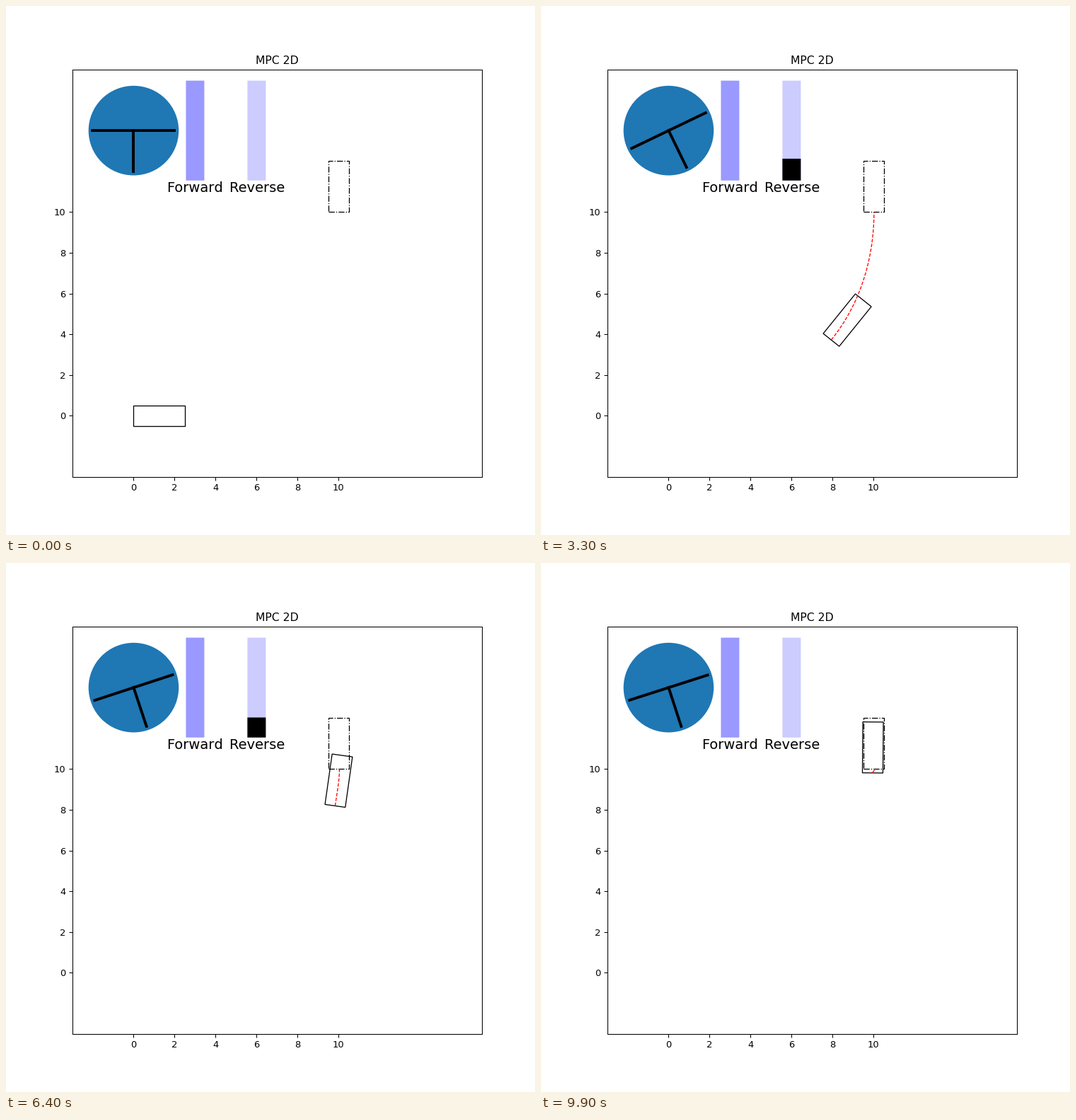
These frames come from a looping animation (748 px wide and 748 px high, 10 s). A matplotlib script:

```python
import numpy as np
import matplotlib.pyplot as plt
from matplotlib.animation import FuncAnimation
from matplotlib.patches import Circle, Rectangle

plt.rcParams["text.kerning_factor"] = 6

FRAMES = 100
LAST = FRAMES - 1
CAR_W, CAR_L = 1.0, 2.5
WHEELBASE = 1.95
DRAG = 0.04
HUB = (0, 14)
FORWARD_X, REVERSE_X, BAR_Y = 3, 6, 12

# Launch, cruise, brake, coast: (end frame, push on the car, pedal shown).
PHASES = ((10, 0.955, 1.1), (33, 0.338, 0.07),
          (37, -0.4, -0.42), (FRAMES, 0.008, -0.2))


def phase(n):
    return next((push, pedal) for end, push, pedal in PHASES if n < end)


def bump(n, centre, width):
    return np.exp(-((n - centre) / width) ** 2)


def wheel_angle(n):
    """Steady left turn, a brief correction, a tighter bend, then easing off."""
    if n == 0:
        return 0.0
    ease = 1 / (1 + np.exp((n - 54) / 4))
    angle = 17.9 + 4.7 * ease + 4.4 * bump(n, 38, 9) - 18 * bump(n, 26, 1.13)
    return np.radians(angle)


def simulate():
    """Bicycle model with drag; step is the distance covered per frame."""
    x = y = psi = step = 0.0
    states = []
    for n in range(FRAMES):
        states.append((x, y, psi))
        x += step * np.cos(psi)
        y += step * np.sin(psi)
        psi += step * np.tan(wheel_angle(n) / 2) / WHEELBASE
        step += DRAG * (phase(n)[0] - step)
    return states


def prediction(x, y, psi, goal_x, goal_y=10):
    """Arc-like Hermite curve that reaches the goal heading straight up."""
    p0, p1 = np.array([x, y]), np.array([goal_x, goal_y])
    turn = np.pi / 2 - psi
    m = np.hypot(*(p1 - p0)) / np.cos(turn / 4) ** 2
    t0 = m * np.array([np.cos(psi), np.sin(psi)])
    t1 = m * np.array([0, 1])
    s = np.linspace(0, 1, 21)[:, None]
    curve = ((2 * s**3 - 3 * s**2 + 1) * p0 + (s**3 - 2 * s**2 + s) * t0
             + (3 * s**2 - 2 * s**3) * p1 + (s**3 - s**2) * t1)
    return curve.T


def place(patch, x, y, psi):
    patch.set_xy((x - np.sin(psi) * CAR_W / 2, y + np.cos(psi) * CAR_W / 2))
    patch.set_angle(np.degrees(psi) - 90)


def set_bar(line, x, level):
    if level > 0:
        line.set_data([x, x], [BAR_Y, BAR_Y + level * 2 / 5])
    else:
        line.set_data([], [])


fig = plt.figure(figsize=(8, 8), dpi=93.5)
ax = fig.add_subplot()
ax.set(xlim=(-3, 17), ylim=(-3, 17), title="MPC 2D",
       xticks=range(0, 11, 2), yticks=range(0, 11, 2))

car = ax.add_patch(Rectangle((0, 0), CAR_W, CAR_L, fill=False))
goal = ax.add_patch(Rectangle((0, 0), CAR_W, CAR_L, fill=False, ls="dashdot"))
place(goal, 10, 10, np.pi / 2)
path, = ax.plot([], [], "r--", lw=1)

ax.add_patch(Circle(HUB, 2.2))
spokes = [ax.plot([], [], "k", lw=3)[0] for _ in range(3)]

bars = []
for bar_x, label, alpha in ((FORWARD_X, "Forward", 0.4),
                            (REVERSE_X, "Reverse", 0.2)):
    ax.plot([bar_x, bar_x], [BAR_Y, BAR_Y + 4], "b", lw=20, alpha=alpha,
            snap=False)
    bars.append(ax.plot([], [], "k", lw=20, snap=False)[0])
    ax.text(bar_x, 11, label, fontsize=15, ha="center")

states = simulate()


def update(n):
    x, y, psi = states[n]
    place(car, x, y, psi)

    angle = wheel_angle(n)
    for spoke, offset in zip(spokes, (0, np.pi, 1.5 * np.pi)):
        a = angle + offset
        spoke.set_data([HUB[0], HUB[0] + 2 * np.cos(a)],
                       [HUB[1], HUB[1] + 2 * np.sin(a)])

    # The pedal is released at both ends of the run.
    pedal = phase(n)[1] if 0 < n < LAST else 0
    set_bar(bars[0], FORWARD_X, pedal)
    set_bar(bars[1], REVERSE_X, -pedal)

    if n:
        path.set_data(*prediction(x, y, psi, 10 + 0.06 * n / LAST))
    else:
        path.set_data([], [])
    return [car, path, *spokes, *bars]


anim = FuncAnimation(fig, update, frames=FRAMES, interval=100,
                     repeat=True, repeat_delay=0)
plt.show()
```
